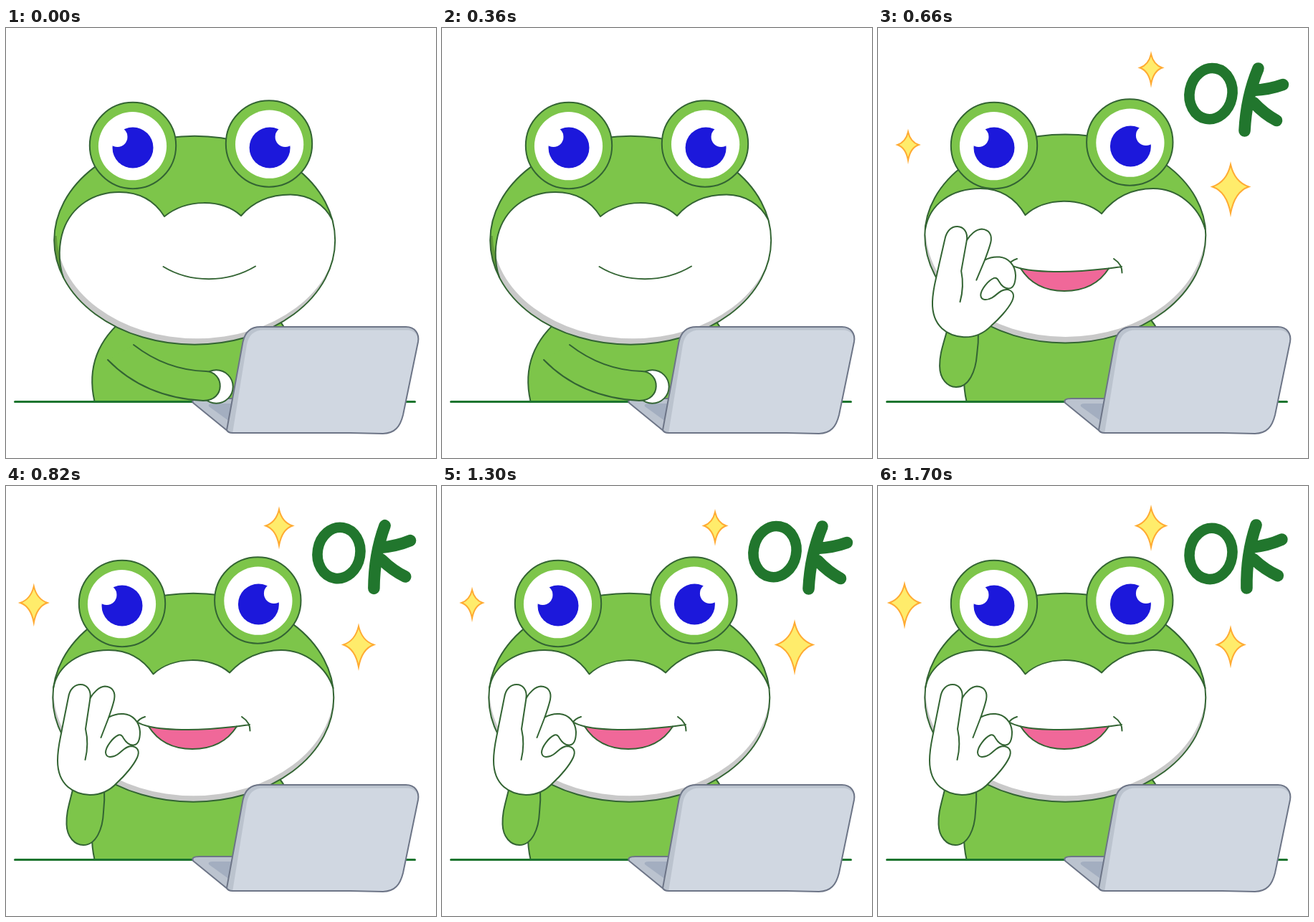
An HTML page with a canvas for the animation above (1.78 s loop, 600 by 600 pixels).

```html
<!DOCTYPE html>
<html lang="en">
<head>
<meta charset="utf-8">
<title>Frog at a laptop</title>
<style>
html, body { margin: 0; width: 100%; height: 100%; overflow: hidden; background: #fff; }
canvas { display: block; width: 600px; height: 600px; }
</style>
</head>
<body>
<canvas id="stage" width="600" height="600"></canvas>
<script>
const ctx = document.getElementById('stage').getContext('2d');
const LOOP = 1780, JUMP = 400, RAISE = 520, OK_START = 580;
const TICK = 40, STEP = 80, TYPE_CYCLE = 200;
const GREEN = '#7dc54a', LINE = '#336433', DARK = '#21762d', STEEL = '#6d7587';

const STARS = [
  { x: 381, y: 55.5, size: 28, grow: -6, drift: 0 },
  { x: 37, y: 163, size: 29, grow: -8, drift: 5 },
  { x: 492, y: 221.5, size: 26, grow: 8, drift: 0 }
];

const mix = (a, b, t) => a + (b - a) * t;

// The picture is held between ticks, so motion is sampled on a coarse clock.
function liftAt(t) {
  if (t < JUMP) return 3 * Math.sin(Math.PI * Math.floor(t % TYPE_CYCLE / TICK) / 4);
  if (t < OK_START) return mix(3, -12, Math.min(1, Math.floor((t - JUMP) / TICK) / 3));
  return -7.5 * Math.max(0, 1 - Math.floor((t - OK_START) / STEP) / 3);
}

function swayAt(t) {
  const beat = Math.floor((t - OK_START) / STEP);
  return 0.68 + 0.754 * Math.cos(beat * Math.PI / 2 - 0.436);
}

function draw(shape, fill, stroke, width = 2) {
  const p = typeof shape === 'string' ? new Path2D(shape) : shape;
  if (fill) { ctx.fillStyle = fill; ctx.fill(p); }
  if (stroke) { ctx.strokeStyle = stroke; ctx.lineWidth = width; ctx.stroke(p); }
}

function oval(x, y, rx, ry = rx, tilt = 0) {
  const p = new Path2D();
  p.ellipse(x, y, rx, ry, tilt, 0, Math.PI * 2);
  return p;
}

// Oval whose widest line moves up or down while top and bottom stay put
function egg(x, y, rx, ry, lift) {
  const p = new Path2D();
  p.ellipse(x, y + lift, rx, ry + lift, 0, Math.PI, Math.PI * 2);
  p.ellipse(x, y + lift, rx, ry - lift, 0, 0, Math.PI);
  p.closePath();
  return p;
}

function at(x, y, angle, paint) {
  ctx.save();
  ctx.translate(x, y);
  ctx.rotate(angle);
  paint();
  ctx.restore();
}

function eye(x, y, dx, dy, side) {
  draw(oval(x, y, 60.2), GREEN, LINE);
  draw(oval(x + dx, y + 0.7, 47.6), '#fff');
  draw(oval(x + dx + 0.5, y + dy, 28.5), '#1c18db');
  draw(oval(x + dx + 0.5 + side * 21.5, y + dy - 15, 14), '#fff');
}

function faceLine(raised, lift) {
  if (!raised) return 'M80 348C72 325 74 300 80 282C92 248 123 229 158 229C188 229 208 242 221 263' +
    'C252 238 301 238 328 262C347 240 371 232.5 397 232.5C424 233 444 246 455 267';
  const top = 229 + lift * 0.7;
  return `M66 282C72 ${top + 21} 103 ${top} 143 ${top}C171 ${top} 191 ${top + 12} 205.5 262.5` +
    `C233 237 285 237 312 260.5C332 ${top + 10} 357 ${top} 384 ${top}C418 ${top} 447 ${top + 24} 456.5 282`;
}

function head(raised, lift) {
  const x = raised ? 261.3 : 263.2, y = raised ? 295.3 : 296.3;
  const skull = egg(x, y, 196, 145.5, lift);
  const line = faceLine(raised, lift);
  draw(skull, GREEN);
  ctx.save();
  ctx.clip(skull);
  draw(line + 'L490 282V460H56Z', '#fff');
  const shade = new Path2D('M0 0H600V600H0Z');
  shade.addPath(egg(x + (raised ? 0.5 : 3), y - 9, 195.5, 146, lift));
  ctx.clip(new Path2D('M0 290H600V600H0Z'));
  ctx.fillStyle = 'rgba(0,0,0,0.21)';
  ctx.fill(shade, 'evenodd');
  ctx.restore();
  draw(line, null, LINE);
  draw(skull, null, LINE);
}

function mouth(raised) {
  if (!raised) {
    draw('M219.5 333C257 356 309 356 348 332.5', null, LINE);
    return;
  }
  draw('M199 335.5C214 339 235 340 254 340C283 340 304 337.5 322 335.5C309 356 288 367 260 367C233 367 212 356 199 335.5Z', '#f06899', LINE);
  draw('M182 329Q189 333 199 335.5M322 335.5L340 333M194 322Q185 325 182 331M329 322Q341 330 340.5 341.5', null, LINE);
}

function typingArm(lift) {
  at(0, -lift, 0, () => {
    draw(oval(293.5, 500.5, 23.2), '#fff', LINE);
    draw('M178 442C205 463 240 478 279 479C305 480 307 520 275 520C220 517 175 497 142 463', GREEN, LINE);
  });
}

function raisedArm(swing) {
  at(107 + swing * 40, 490, swing, () => {
    ctx.translate(-107, -490);
    draw('M94 420C88 445 84 455 84.5 472C85 490 96 501 108 501C126 501 135 478 136 455Q138 438 137 422', GREEN, LINE);
    draw('M117 431C95 430 72 418 72 383C72 365 76 352 78 340L87 295C89 283 96 277 104 277' +
      'C113 277 119 285 117.5 296C122 288 130 280 138 279.5C149 280 153 288 151 298C149 307 146 315 143.5 322.5' +
      'C150 319 158 317.5 164 318C176 319 186 328 187 343C187 355 184 361 178 361.5' +
      'C172 362 167 357 164 352C162 348 160 346.5 157 347.5C149 351 139 364 139 372' +
      'C140 380 148 379 155 375C162 371 166 363 175 363C184 364 187 370 183 379' +
      'C178 390 165 405 155 414C145 425 132 431 117 431Z', '#fff', LINE);
    draw('M117.5 296L111 339C114 352 114 368 110.5 382M143.5 322.5L132.5 351', null, LINE);
  });
}

function laptopBase() {
  draw('M310 563L261 523Q258 517 270 517H325L315 563Z', '#bbc3cf', STEEL);
  draw('M312 549L283 528Q281 524 289 524H320Z', '#a3aec0');
}

function laptopScreen() {
  const lid = new Path2D('M308 561L330.5 438Q335 417 355 417H558C571 417 577 427 575 438' +
    'L554 540C550 556 543 565.5 526 566L480 565H316Q310 565 308 561Z');
  draw(lid, '#bbc3ce');
  ctx.save();
  ctx.clip(lid);
  draw('M316 566L336 442Q340 421.5 359 421.5H560Q573 422 576 436L600 440V580H316Z', '#d0d7e1');
  ctx.restore();
  draw(lid, null, STEEL);
}

function star({ x, y, size, grow, drift }, sway) {
  const h = size + grow * sway - 3, w = h * 0.82, low = h * 1.2;
  const c = w * 0.22, d = h * 0.22;
  at(x + drift * sway, y, 0, () => draw(
    `M0 ${-h}Q${c} ${-d} ${w} 0Q${c} ${d} 0 ${low}Q${-c} ${d} ${-w} 0Q${-c} ${-d} 0 ${-h}Z`, '#ffec6b', '#ffab33'));
}

function letters(sway) {
  draw(oval(464.5, mix(94.4, 91.6, sway), 29.8, 35.8, mix(0.15, 0.2, sway)), null, DARK, 14.6);
  at(521, mix(98.5, 100, sway), mix(-0.067, 0, sway), () =>
    draw('M9.5 -43.5C-2 -16 -8 14 -9.5 43.5M44 -21Q25 -14 2 -13M35 29Q18 20 3 4', null, DARK, 16.6));
}

function render(t) {
  const raised = t >= RAISE, lift = liftAt(t);
  const bounce = t < OK_START ? lift : 0;
  ctx.fillStyle = '#fff';
  ctx.fillRect(0, 0, 600, 600);
  ctx.lineCap = ctx.lineJoin = 'round';

  draw(`M${raised ? 148 : 168} 403C131 432 112 470 123.5 521H400V440Q392 421 379 405Z`, GREEN, LINE);
  draw('M12.5 521.5H570.5', null, '#1d752f', 3);
  at(0, lift * 0.28, 0, () => head(raised, lift));
  at(0, bounce, 0, () => {
    mouth(raised);
    eye(raised ? 162 : 177, 164, -0.5, 3, -1);
    eye(raised ? 351.3 : 367, raised ? 159.5 : 161.5, 0.6, 5.5, 1);
  });
  laptopBase();
  if (raised) raisedArm(-lift * 0.0054); else typingArm(lift);
  laptopScreen();

  if (t >= OK_START) {
    const sway = swayAt(t);
    letters(sway);
    ctx.lineJoin = 'miter';
    STARS.forEach(s => star(s, sway));
  }
}

const start = performance.now();
function tick() {
  render((performance.now() - start) % LOOP);
  requestAnimationFrame(tick);
}
tick();
</script>
</body>
</html>
```
